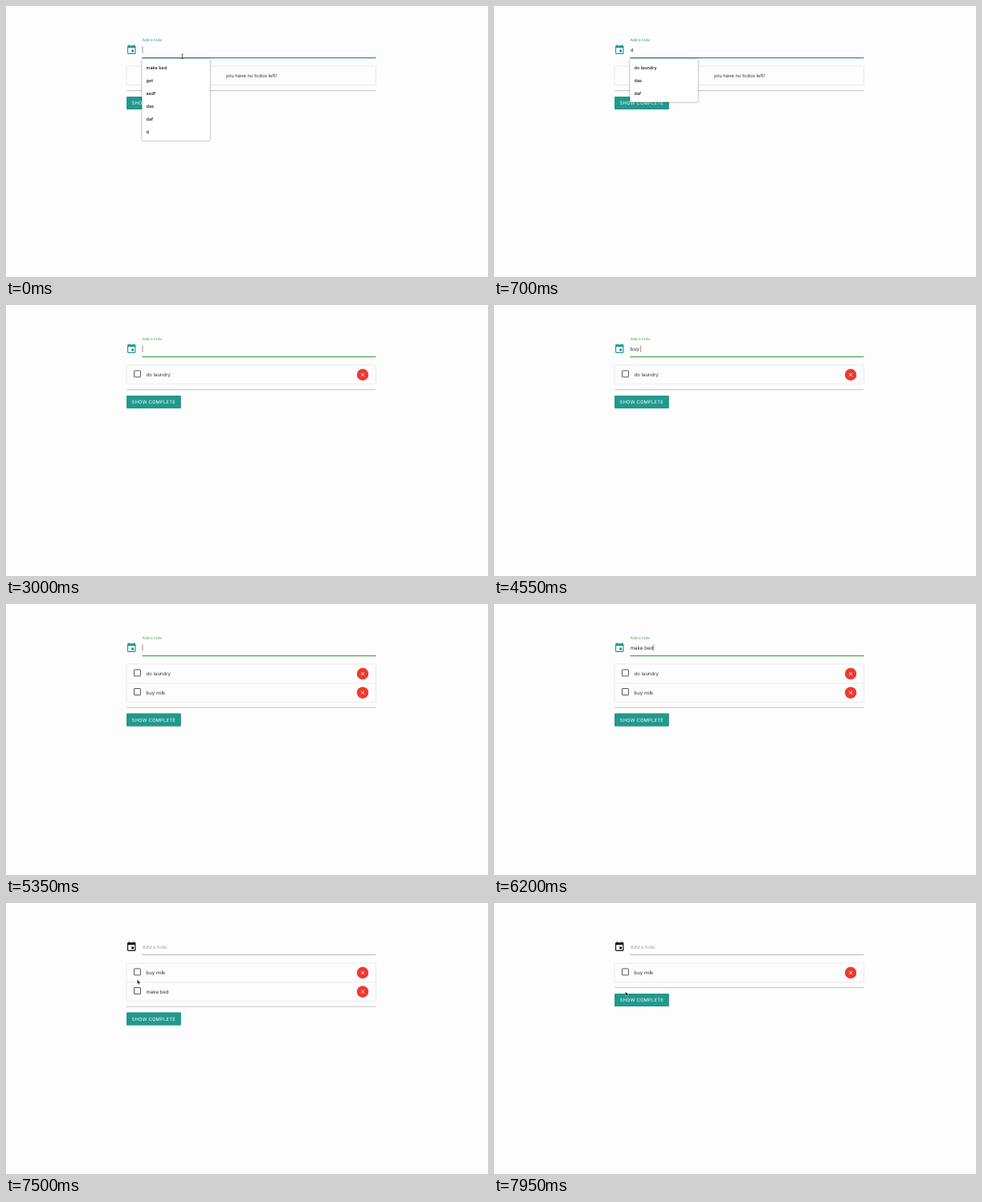
Animation, 600 px wide and 338 px high, one loop 8000 ms. Source, as an HTML page:

```html
<!DOCTYPE html>
<html lang="en">
<head>
<meta charset="utf-8">
<title>Todo list</title>
<style>
  html, body { margin: 0; width: 100%; height: 100%; overflow: hidden; background: #fefdfe; }
  svg { display: block; width: 100vw; height: 100vh; }
  text { font-family: Inter, Roboto, sans-serif; white-space: pre; text-rendering: geometricPrecision; }
  .raised { filter: drop-shadow(0 .6px .7px rgba(0, 0, 0, .38)); }
  .popup { filter: drop-shadow(0 .7px 1px rgba(0, 0, 0, .5)); }
</style>
</head>
<body>
<svg id="stage" viewBox="0 0 600 338"></svg>
<script>
const LOOP = 8000, STEP = 50, BLINK = 250, ROW = 23.6;
const TEAL = [34, 153, 140], GREEN = [76, 168, 80], GREY = [158, 158, 158], BLACK = [20, 20, 20];
const INPUT_SIZE = 6.2, INPUT_X = 169.7;
const BLUR = 7150;

// Text of each entry, when its keys are pressed, and when it is submitted.
const entries = [
  { text: 'do laundry', keys: [250, 850, 950, 1400, 1550, 1700, 1900, 2000, 2100, 2200], enter: 2450, done: 7200 },
  { text: 'buy milk', keys: [3950, 4100, 4350, 4500, 4750, 4850, 4950, 5000], enter: 5250, done: Infinity },
  { text: 'make bed', keys: [5550, 5650, 5700, 5800, 5900, 6000, 6050, 6150], enter: 6300, done: 7800 },
];
const presses = [-200, ...entries.flatMap(e => [...e.keys, e.enter])];
const pointerPath = [[6500, 219.5, 63], [6750, 195, 74], [7000, 163.3, 87.3], [7400, 163.3, 87.3], [7650, 163.5, 110.4]];

const stage = document.getElementById('stage');
const ruler = document.createElement('canvas').getContext('2d');

const clamp = v => Math.max(0, Math.min(1, v));
const mix = (a, b, p) => a + (b - a) * p;
const blend = (a, b, p) => `rgb(${a.map((v, i) => Math.round(mix(v, b[i], p)))})`;

function label(x, y, size, fill, content, extra = '') {
  return `<text x="${x}" y="${y}" font-size="${size}" fill="${fill}" ${extra}>${content}</text>`;
}

function inputWidth(text) {
  ruler.font = `${INPUT_SIZE * 10}px Inter, Roboto, sans-serif`;
  return ruler.measureText(text).width / 10;
}

function typedAt(t) {
  const entry = entries.find(e => t >= e.keys[0] && t < e.enter);
  return entry ? entry.text.slice(0, entry.keys.filter(k => k <= t).length) : '';
}

function suggestionsAt(t, typed) {
  if (t < entries[0].keys[0]) return ['make bed', 'get', 'asdf', 'das', 'daf', 'd'];
  if (!typed) return [];
  return ['do laundry', 'das', 'daf', 'make bed'].filter(s => s.startsWith(typed) && s !== typed);
}

function field(t, typed) {
  const valid = clamp((t - 2450) / 100), blur = clamp((t - BLUR) / 100);
  const active = TEAL.map((v, i) => mix(v, GREEN[i], valid));
  const tone = blend(active, GREY, blur);
  const lastPress = Math.max(...presses.filter(p => p <= t));
  const caretOn = t < BLUR && Math.floor((t - lastPress) / BLINK) % 2 === 0;
  const caretX = INPUT_X + inputWidth(typed) + .3;
  return `<path transform="translate(149.2 47.6) scale(.585)" fill="${blend(TEAL, BLACK, blur)}"
      d="M17 12h-5v5h5zM16 1v2H8V1H6v2H5c-1.1 0-2 .9-2 2v14c0 1.1.9 2 2 2h14c1.1 0 2-.9 2-2V5c0-1.1-.9-2-2-2h-1V1zm3 18H5V8h14z"/>`
    + label(INPUT_X, mix(44, 57, blur), mix(4.75, 5.95, blur), tone, 'Add a todo')
    + label(INPUT_X, 57, INPUT_SIZE, '#2b2b2b', typed)
    + (caretOn ? `<path d="M${caretX} 50.5v8.3" stroke="#555" stroke-width=".6"/>` : '')
    + `<path d="M169.5 64.6H460.3" stroke="${tone}" stroke-width="${mix(1.3, .75, blur)}"/>`;
}

function todoRow(text, i) {
  const y = 87 + i * ROW;
  return (i ? `<path d="M150 ${y - 11.8}h310" stroke="#dedede" stroke-width=".6"/>` : '')
    + `<rect x="159.5" y="${y - 5.1}" width="8" height="8" rx=".5" fill="none" stroke="#5a5a5a" stroke-width="1"/>`
    + label(174.5, y + 2.2, 6.05, '#333', text)
    + `<circle class="raised" cx="444" cy="${y}" r="7.2" fill="#f0382f"/>`
    + `<path d="M441.9 ${y - 2.1}l4.2 4.2m0-4.2l-4.2 4.2" stroke="#fff" stroke-width=".8"/>`;
}

function list(t) {
  const todos = entries.filter(e => t >= e.enter && t < e.done);
  const extra = (Math.max(1, todos.length) - 1) * ROW;
  const rows = todos.length
    ? todos.map((e, i) => todoRow(e.text, i)).join('')
    : label(305.3, 89.2, 5.95, '#333', 'you have no todos left!', 'text-anchor="middle"');
  return `<rect x="150" y="75" width="310.3" height="${ROW + extra}" rx="1" fill="none" stroke="#dedede" stroke-width=".6"/>`
    + rows
    + `<path d="M149.7 ${105.6 + extra}H460.3" stroke="#b5b5b5" stroke-width=".8"/>`
    + `<rect class="raised" x="150" y="${113 + extra}" width="67.8" height="15.9" rx=".9" fill="rgb(${TEAL})"/>`
    + label(156.6, 123.1 + extra, 5.8, '#fff', 'SHOW COMPLETE', 'letter-spacing=".22"');
}

function popup(items) {
  if (!items.length) return '';
  return `<rect class="popup" x="169.3" y="66" width="84.5" height="${items.length * 16 + 5.7}" rx="1" fill="#fff"/>`
    + items.map((s, i) => label(174.5, 78.7 + i * 16, 5.5, '#111', s, 'font-weight="500"')).join('');
}

function pointerAt(t) {
  if (t < 200) return [219.5, 63];
  if (t < pointerPath[0][0]) return null;
  const next = pointerPath.findIndex(p => p[0] > t);
  if (next < 0) return pointerPath.at(-1).slice(1);
  const [t0, x0, y0] = pointerPath[next - 1], [t1, x1, y1] = pointerPath[next];
  const p = (t - t0) / (t1 - t0), ease = p * p * (3 - 2 * p);
  return [mix(x0, x1, ease), mix(y0, y1, ease)];
}

function pointer(t) {
  const at = pointerAt(t);
  if (!at) return '';
  const [x, y] = at;
  const overBox = x < 168 && t < 7800 && (Math.abs(y - 86.5) < 5 || Math.abs(y - 109.8) < 5);
  let shape = '<path d="M0 0V5.7L1.3 4.5L2.2 6.5L3.1 6.1L2.3 4.2H4.1z" fill="#111" stroke="#fff" stroke-width=".4"/>';
  if (y < 66) {
    shape = '<path d="M-1.2-3Q0-3 0-2.2Q0-3 1.2-3M0-2.4V2.4M-1.2 3Q0 3 0 2.2Q0 3 1.2 3" fill="none" stroke="#333" stroke-width=".7"/>';
  } else if (overBox) {
    shape = `<path d="M-.5.5Q0-.3.6.5V2.8Q1.2 2.3 1.6 3Q2.2 2.6 2.6 3.3Q3.4 3 3.5 3.9V5.2L2.8 7.4H-.3L-2 4.7Q-1.9 3.7-.5 4.8z"
      fill="#fff" stroke="#222" stroke-width=".55" stroke-linejoin="round"/>`;
  }
  return `<g transform="translate(${x} ${y})">${shape}</g>`;
}

function draw(t) {
  const typed = typedAt(t);
  stage.innerHTML = field(t, typed) + list(t) + popup(suggestionsAt(t, typed)) + pointer(t);
}

const start = performance.now();
let shown = -1;
function tick() {
  const t = Math.floor((performance.now() - start) % LOOP / STEP) * STEP;
  if (t !== shown) draw(shown = t);
  requestAnimationFrame(tick);
}
tick();
</script>
</body>
</html>
```
